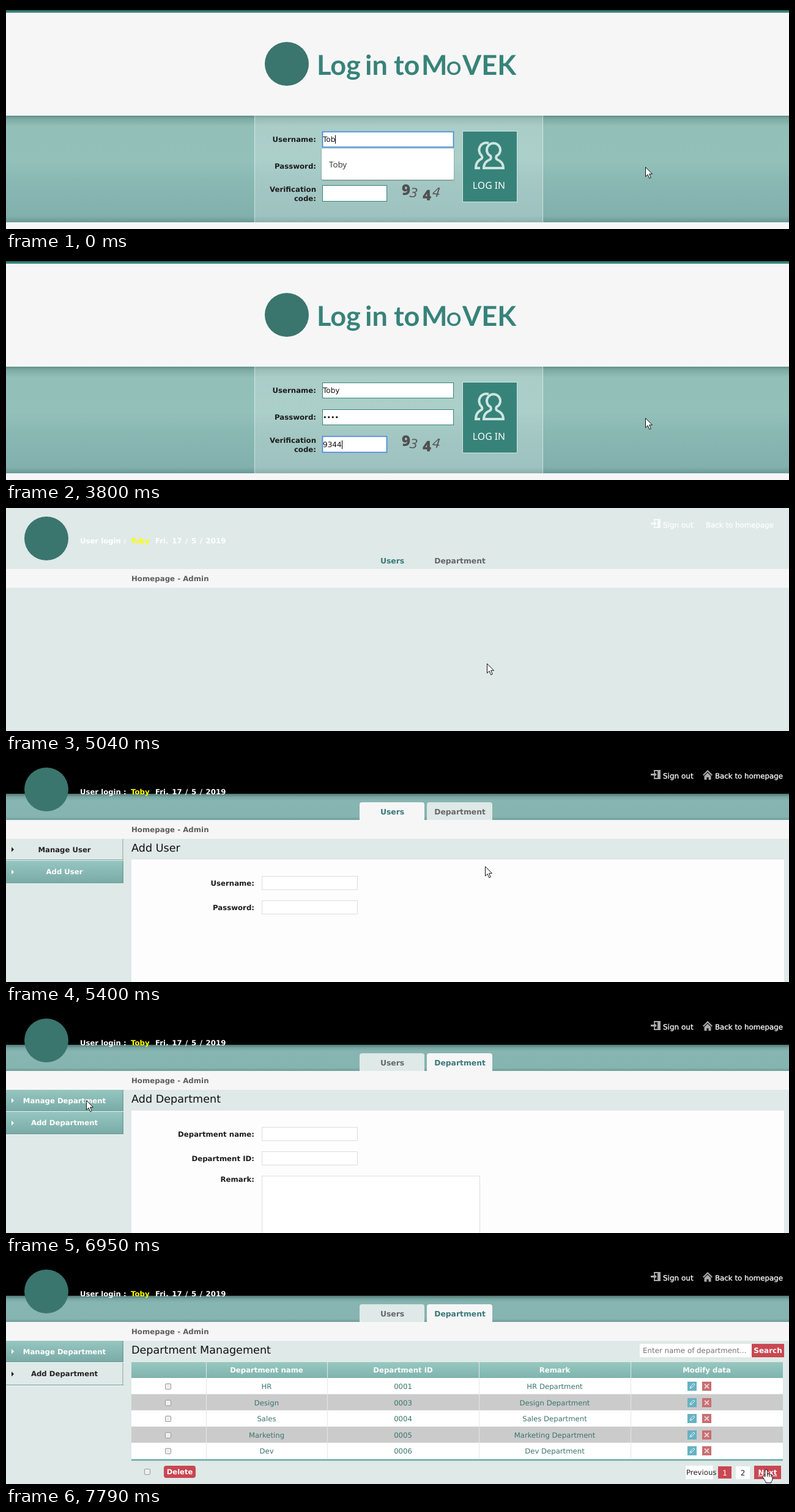
Recreate the animation shown at these times as an HTML page. Size 1280x366 px, loop 8 s.

```html
<!DOCTYPE html>
<html lang="en">
<head>
<meta charset="utf-8">
<title>Admin login</title>
<style>
html, body { margin: 0; width: 100%; height: 100%; overflow: hidden; background: #f6f6f6; }
svg { display: block; width: 1280px; height: 366px; }
text { font-family: "DejaVu Sans", sans-serif; text-rendering: geometricPrecision; white-space: pre; }
.b { font-weight: bold; }
.m { text-anchor: middle; }
.e { text-anchor: end; }
.lato { font-family: Lato, sans-serif; font-weight: bold; }
.noto { font-family: "Noto Sans", sans-serif; }
.open { font-family: "Open Sans", sans-serif; }
.heavy { font-weight: 800; font-stretch: 75%; }
</style>
</head>
<body>
<svg id="stage" viewBox="0 0 1280 366"></svg>
<script>
const TEAL = '#37837a', DEEP = '#3a756e', RED = '#c94752', PALE = '#dfe9e7', LIGHT = '#f6f6f6';
const LOOP = 8000;
const NAME = 'Toby';

const rect = (x, y, w, h, fill, more = '') =>
  `<rect x="${x}" y="${y}" width="${w}" height="${h}" fill="${fill}" ${more}/>`;
const box = (x, y, w, h, stroke, id = '') =>
  rect(x + .5, y + .5, w - 1, h - 1, '#fff', `stroke="${stroke}" ${id && `id="${id}"`}`);
const text = (x, y, s, size, fill, cls = '', more = '') =>
  `<text x="${x}" y="${y}" font-size="${size}" fill="${fill}" class="${cls}" ${more}>${s}</text>`;
const path = (d, more = '') => `<path d="${d}" ${more}/>`;
const group = (id, ...parts) => `<g id="${id}">${parts.join('')}</g>`;
const gradient = (id, ...stops) =>
  `<linearGradient id="${id}" x2="0" y2="1">${stops.map(([o, c]) =>
    `<stop offset="${o}" stop-color="${c}"/>`).join('')}</linearGradient>`;
const logo = (x, y) => `<circle cx="${x}" cy="${y}" r="36" fill="${DEEP}"/>`;
const label = (x, y, s) => text(x, y, s, 11.75, '#1c1c1c', 'b e');

const defs = `<defs>
  ${gradient('band', [0, '#5f8f88'], [.03, '#7daba4'], [.1, '#92bfb8'], [.42, '#93c1ba'],
    [.6, '#8ab8b3'], [.94, '#82b1ad'], [1, '#6a9a96'])}
  ${gradient('bar', [0, '#4f7773'], [.12, '#79a6a2'], [.25, '#87b5b1'], [.88, '#86b4b0'], [1, '#6f9c98'])}
  ${gradient('item', [0, '#96c6c0'], [1, '#7aaaa6'])}
  ${gradient('head', [0, '#97c8c1'], [1, '#7fb3ae'])}
  <filter id="soft" x="-5%" y="-15%" width="110%" height="140%">
    <feDropShadow dx="0" dy="1" stdDeviation="1.2" flood-opacity=".35"/></filter>
</defs>`;

// Login page
const person = 'M781 266H813Q813 256 803 252Q800 250 802 246A11 11 0 1 0 792 246Q794 250 791 252Q781 256 781 266Z';
const personBack = 'M775 266H768Q768 255 777 251Q780 249 777 245A12 12 0 0 1 789 225';
const login = group('login',
  rect(0, 0, 1280, 366, LIGHT), rect(0, 0, 1280, 7, '#000'), rect(0, 7, 1280, 4, TEAL),
  logo(459, 95),
  [[508, 'Log'], [587, 'in'], [634, 'to'], [679, 'M'], [746, 'VEK']]
    .map(([x, s]) => text(x, 113, s, 45, TEAL, 'lato')).join(''),
  text(720, 113, 'O', 30, TEAL, 'lato'),
  rect(0, 180, 1280, 175, 'url(#band)'),
  rect(406, 180, 472, 175, '#fff', 'opacity=".22"'),
  [406, 877].map(x => rect(x, 180, 1, 175, '#fff', 'opacity=".5"')).join(''),
  label(507, 223, 'Username:'), label(507, 267, 'Password:'),
  label(507, 305, 'Verification'), label(507, 320, 'code:'),
  box(517, 206, 215, 26, TEAL, 'user'), box(517, 250, 215, 26, TEAL, 'pass'), box(517, 294, 106, 27, TEAL, 'code'),
  text(518, 223, '', 12, '#111', '', 'id="userText"'),
  text(518, 267, '', 11, '#111', '', 'id="passText"'),
  text(518, 312, '', 12, '#111', '', 'id="codeText"'),
  rect(0, 0, 1, 14, '#000', 'id="caret"'),
  group('suggest', rect(516, 234, 216, 51, '#fff', 'rx="2" filter="url(#soft)"'),
    text(528, 265, NAME, 13.3, '#333', 'open')),
  text(647, 310, '9', 24, '#505050', 'open heavy'),
  text(660, 314, '3', 21, '#5a5a5a', '', 'font-style="italic" transform="rotate(6 667 307)"'),
  text(681, 319, '4', 24, '#505050', 'open heavy'),
  text(697, 313, '4', 21, '#5a5a5a', '', 'font-style="italic" transform="rotate(6 704 306)"'),
  rect(746.5, 205.5, 89, 116, TEAL, 'stroke="#d0e4e1" id="button"'),
  `<g fill="none" stroke="#cfe5e1" stroke-width="4">${path(personBack)}${path(person)}</g>`,
  text(789.5, 300, 'LOG IN', 15.8, '#fff', 'noto m', 'font-weight="500"'));

// Admin pages
const tab = (x, w, s, id) =>
  path(`M${x} 100V75q0-4 4-4h${w - 8}q4 0 4 4v25z`, `id="${id}Tab"`) +
  text(x + w / 2 + .5, 91, s, 12.35, '#666', 'b m', `id="${id}Word"`);
const item = (y, h, s, id) => group(id,
  rect(0, y, 192, h, 'url(#item)', 'class="fill"'), rect(190, y, 2, h, '#5d8985', 'opacity=".35"'),
  path(`M9 ${y + h / 2 - 4}v8l4-4z`, 'class="ink" fill="#fff"'),
  text(95.5, y + 22, s, 11.7, '#fff', 'b m ink'),
  rect(0, y + h - 1, 192, 1, '#6c9f9a'), rect(0, y + h, 192, 1, '#eef5f4'));
const sidebar = (what, id) => item(131, 35, 'Manage ' + what, id + 'Manage') + item(167, 37, 'Add ' + what, id + 'Add');
const heading = s => text(205, 152, s, 17.6, '#111');
const panel = rect(205, 165, 1067, 201, '#fdfdfd');
const input = (y, s) => label(406, y + 16, s) + box(418, y, 157, 23, '#ddd');

const rows = [['HR', '0001'], ['Design', '0003'], ['Sales', '0004'], ['Marketing', '0005'], ['Dev', '0006']];
const cols = [205, 327, 525, 773, 1021, 1270];
const mid = i => (cols[i] + cols[i + 1]) / 2;
const check = (x, y) => rect(x + .5, y + .5, 9, 9, '#eee', 'rx="1.5" stroke="#999"');
const row = ([name, id], i) => {
  const y = 192 + 26.6 * i;
  return rect(205, y, 1065, 26.6, i % 2 ? '#cbcbcb' : '#fff') + check(260, Math.round(y + 9)) +
    [name, id, name + ' Department'].map((s, k) => text(mid(k + 1), y + 18, s, 11.7, DEEP, 'm')).join('') +
    `<g transform="translate(1114 ${Math.round(y + 6)})">` +
    rect(0, 0, 15, 15, '#66b2c3') + path('M4 11l1-3 5-5 2 2-5 5zM5 8l2 2', 'fill="none" stroke="#e4f3f6"') +
    rect(24, 0, 15, 15, '#c96d70') + path('M28 4l7 7m0-7l-7 7', 'stroke="#ead0d0" stroke-width="2"') + '</g>';
};

const admin = group('admin',
  rect(0, 0, 1280, 366, PALE),
  group('skin', rect(0, 0, 1280, 57, '#000'), rect(0, 57, 1280, 43, 'url(#bar)')),
  logo(66, 50),
  text(121, 58, 'User login :', 11.7, '#fff', 'b'),
  text(204, 58, NAME, 11.8, '#ff0', 'b'),
  text(244, 58, 'Fri. 17 / 5 / 2019', 11.8, '#fff', 'b', 'style="word-spacing:.12em"'),
  group('door', path('M1059 18h11v15h-11v-4h2v2h4V20h-4v2h-2zM1054 24h5v-3l5 4.500-5 4.500v-3h-5z', 'fill-rule="evenodd"')),
  text(1074, 32, 'Sign out', 12, '#fff', '', 'stroke="#fff" stroke-width=".3"'),
  group('house', path('M1139 26l8-8 8 8-1.500 1.500-6.500-6.500-6.500 6.500zM1141.500 28l5.500-5.500 5.500 5.500v6h-4v-4h-3v4h-4z', 'fill="#aaa"')),
  text(1159, 32, 'Back to homepage', 11.8, '#fff', '', 'id="back" stroke="#fff" stroke-width=".3"'),
  tab(578, 106, 'Users', 'users'), tab(688, 107, 'Department', 'dept'),
  rect(0, 100, 1280, 31, LIGHT),
  text(205, 120, 'Homepage - Admin', 11.8, '#5e5e5e', 'b'),
  group('userForm', sidebar('User', 'user'), heading('Add User'), panel,
    input(192, 'Username:'), input(232, 'Password:')),
  group('deptForm', sidebar('Department', 'form'), heading('Add Department'), panel,
    input(192, 'Department name:'), input(232, 'Department ID:'),
    label(406, 282, 'Remark:'), box(418, 272, 357, 110, '#ddd')),
  group('deptList', sidebar('Department', 'list'), heading('Department Management'),
    rect(1036, 136, 183, 22, '#fff'), text(1041, 151, 'Enter name of department...', 11.85, '#757575'),
    rect(1219, 136, 53, 22, RED), text(1245.5, 151, 'Search', 12, '#fff', 'b m'),
    rect(205, 166, 1065, 26, 'url(#head)'),
    ['Department name', 'Department ID', 'Remark', 'Modify data']
      .map((s, i) => text(mid(i + 1), 183, s, 11.7, '#fff', 'b m')).join(''),
    rows.map(row).join(''),
    cols.slice(1, 5).map(x => rect(x, 166, 1, 159, '#e6e6e6')).join(''),
    rect(205, 325, 1065, 3, '#7cb5af'),
    check(226, 341), rect(258, 336, 52, 20, RED, 'rx="4"'), text(284, 350, 'Delete', 11.5, '#fff', 'b m'),
    rect(1111, 336, 45, 22, '#fff'), text(1112, 351, 'Previous', 11.7, '#222'),
    rect(1164, 337, 22, 20, RED), text(1175, 352, '1', 12, '#fff', 'm'),
    rect(1193, 337, 23, 21, '#fff'), text(1204.5, 352, '2', 12, '#222', 'm'),
    rect(1223, 336, 44, 22, RED), text(1245, 351, 'Next', 11.7, '#fff', 'b m', 'id="next"')));

const pointer = group('arrow',
    path('M.5.5V16l3.600-3.400 2.700 6.200 2.500-1.100-2.700-6H11.500z', 'fill="#fff" stroke="#111" stroke-linejoin="round"')) +
  group('hand', path('M-2 2a1.800 1.800 0 0 1 3.600 0V8q2-1.500 3.200.6 2-1.200 3.200.8Q10 9 10 11.500V16q-.4 3-2 4.500V22H-1v-1.500Q-3 18-6 12.500-5.500 9.500-2.500 11.500L-2 12Z', 'fill="#fff" stroke="#111" stroke-linejoin="round"') +
    path('M1.600 8v4M4.800 9v3.500M8 9.800v3', 'stroke="#111"'));

const stage = document.getElementById('stage');
stage.innerHTML = defs + login + admin + group('mouse', pointer);

const $ = id => document.getElementById(id);
const show = (id, on) => { $(id).style.display = on ? '' : 'none'; };
const typed = (times, t) => times.filter(at => t >= at).length;
const between = (t, a, b) => t >= a && t < b;

// start, end, from, to
const moves = [
  [4160, 4850, [1045, 264], [786, 255]],
  [5100, 5730, [786, 255], [779, 86]],
  [6350, 6740, [779, 86], [131, 148]],
  [7050, 7750, [131, 148], [1243, 342]]
];
function mouseAt(t) {
  let p = moves[0][2];
  for (const [a, b, from, to] of moves) {
    if (t < a) break;
    const u = Math.min(1, (t - a) / (b - a)), k = u * u * (3 - 2 * u);
    p = from.map((v, i) => v + (to[i] - v) * k);
  }
  return p;
}

function drawLogin(t) {
  const focus = t < 530 ? 'user' : t < 1110 ? 'button' : t < 2580 ? 'pass' : t < 4800 ? 'code' : 'button';
  $('userText').textContent = t < 320 ? NAME.slice(0, 3) : NAME;
  $('passText').textContent = '•'.repeat(typed([1680, 1880, 2080, 2310], t));
  $('codeText').textContent = '9344'.slice(0, typed([2960, 3410, 3630, 3800], t));
  for (const id of ['user', 'pass', 'code', 'button']) {
    const on = id === focus;
    $(id).setAttribute('stroke', on ? '#4a8adf' : id === 'button' ? '#d0e4e1' : TEAL);
    $(id).setAttribute('stroke-width', on ? 1.7 : 1);
  }
  show('suggest', t < 320);
  const blink = between(t, 1620, 1680) || between(t, 2890, 2960) || t >= 4300;
  show('caret', focus !== 'button' && !blink);
  if (focus !== 'button') {
    const field = $(focus + 'Text');
    $('caret').setAttribute('x', Math.round(518 + field.getComputedTextLength()));
    $('caret').setAttribute('y', +field.getAttribute('y') - 11);
  }
}

function setItem(id, on) {
  $(id).querySelector('.fill').setAttribute('fill', on ? 'url(#item)' : PALE);
  $(id).querySelectorAll('.ink').forEach(n => n.setAttribute('fill', on ? '#fff' : '#222'));
}

function setTab(id, active, lit, styled) {
  $(id + 'Tab').setAttribute('fill', styled && lit ? LIGHT : PALE);
  $(id + 'Word').setAttribute('fill', active || lit ? '#39787a' : '#666');
}

function drawAdmin(t, [x, y]) {
  const styled = t >= 5070, dept = t >= 5990;
  const onTab = x > 688 && x < 795 && y > 71 && y < 100;
  show('skin', styled);
  show('house', styled);
  $('door').setAttribute('fill', styled ? '#aaa' : '#f6faf9');
  $('back').setAttribute('x', styled ? 1159 : 1144);
  setTab('users', !dept, !dept, styled);
  setTab('dept', dept, dept || onTab, styled);
  show('userForm', between(t, 5110, 6030));
  show('deptForm', between(t, 6110, 6980));
  show('deptList', t >= 7040);
  const over = top => x < 192 && between(y, top, top + 36);
  setItem('userManage', false);
  setItem('formManage', over(131));
  setItem('listAdd', over(167));
  $('next').setAttribute('text-decoration', t >= 7760 ? 'underline' : 'none');
}

function frame(now) {
  const t = now % LOOP, inside = t >= 5000, p = mouseAt(t), [x, y] = p;
  show('login', !inside);
  show('admin', inside);
  inside ? drawAdmin(t, p) : drawLogin(t);
  const hand = inside ? (y < 100 && x > 688) || t >= 7760 : x < 835;
  show('hand', hand);
  show('arrow', !hand);
  $('mouse').setAttribute('transform', `translate(${Math.round(x)} ${Math.round(y)})`);
}

const begin = performance.now();
function tick() {
  frame(performance.now() - begin);
  requestAnimationFrame(tick);
}
tick();
</script>
</body>
</html>
```
